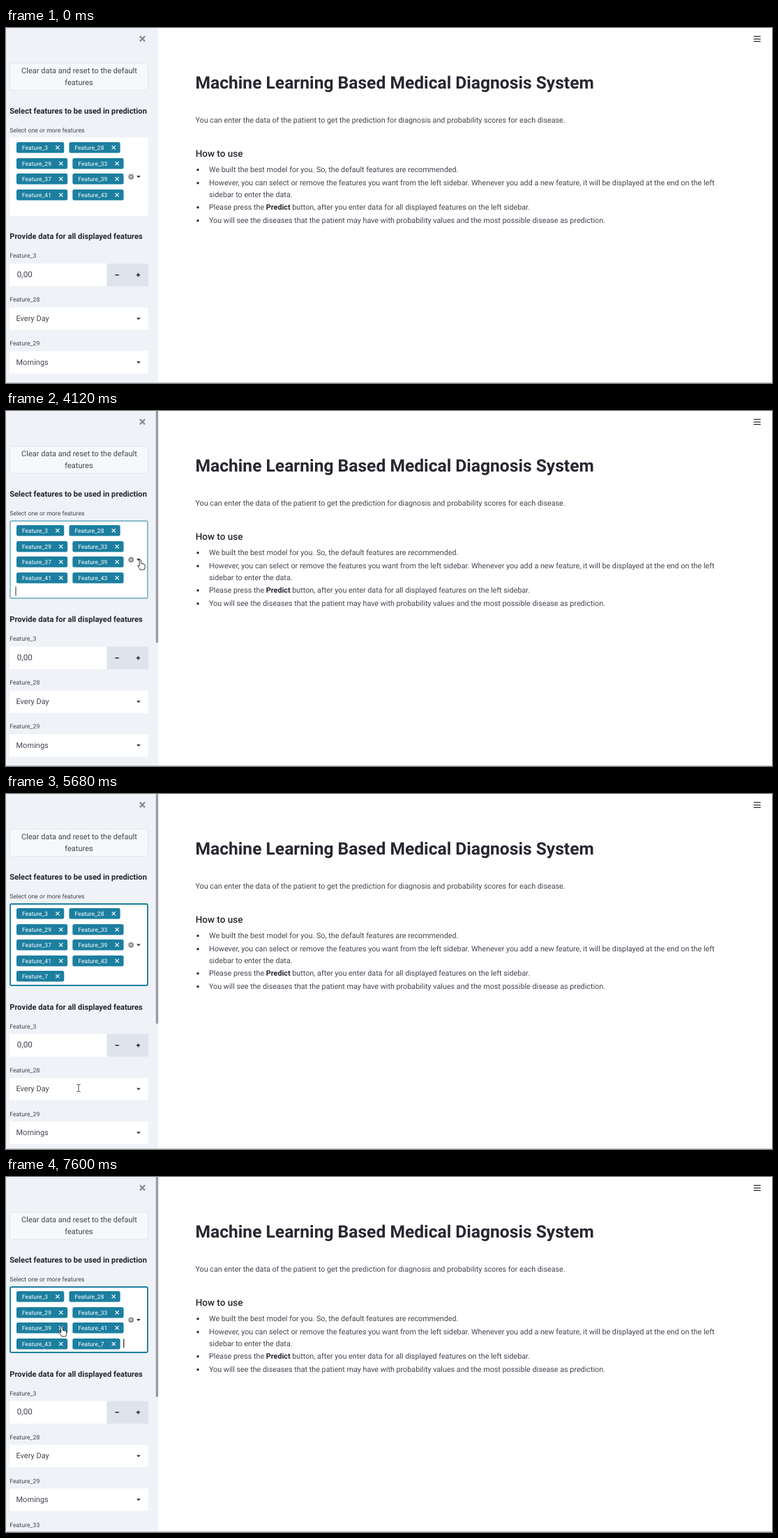
Write an HTML page that moves like this. It is 1098x510 px and loops after 8 s.

```html
<!DOCTYPE html>
<html lang="en">
<head>
<meta charset="utf-8">
<title>Diagnosis form</title>
<style>
html, body { margin: 0; width: 100%; height: 100%; overflow: hidden; background: #fff; }
svg { display: block; width: 1098px; height: 510px; }
text { font-family: Roboto, "Noto Sans", sans-serif; font-size: 11px; fill: #43454f; text-rendering: geometricPrecision; white-space: pre; }
.title { font-size: 24.6px; font-weight: 700; fill: #262730; }
.sub { font-size: 13.5px; font-weight: 500; fill: #262730; }
.head { font-size: 11.2px; font-weight: 700; fill: #262730; }
.body { font-size: 10.78px; }
.body tspan { font-weight: 700; fill: #262730; }
.label { font-size: 8.75px; }
.tag { font-size: 8.5px; fill: #fff; }
.small { font-size: 8.6px; }
.number { font-size: 11.7px; }
.mid { text-anchor: middle; }
.menu { filter: drop-shadow(0 2px 3px rgba(0, 0, 0, .4)); }
</style>
</head>
<body>
<svg id="stage" viewBox="0 0 1098 510"></svg>
<script>
const LOOP = 8000, TEAL = '#1c7fa0', INK = '#262730';
const stage = document.getElementById('stage');

const rect = (x, y, w, h, fill, extra = '') =>
  `<rect x="${x}" y="${y}" width="${w}" height="${h}" fill="${fill}" ${extra}/>`;
const text = (x, y, str, cls = '') => `<text x="${x}" y="${y}" class="${cls}">${str}</text>`;
const line = (d, color, width) =>
  `<path d="${d}" fill="none" stroke="${color}" stroke-width="${width}"/>`;
const cross = (x, y, r, color, width) =>
  line(`M${x - r} ${y - r}l${2 * r} ${2 * r}m0 ${-2 * r}l${-2 * r} ${2 * r}`, color, width);
const arrow = (x, y) => `<path d="M${x - 2.8} ${y - 1.4}h5.6l-2.8 3z" fill="${INK}"/>`;
const group = (opacity, inner, cls = '') => `<g opacity="${opacity}" class="${cls}">${inner}</g>`;
const ramp = (t, a, b) => Math.min(1, Math.max(0, (t - a) / (b - a)));

// Pointer path: time, x, y
const path = [
  [1380, 203, 478], [1590, 166, 360], [1730, 169, 293], [1940, 160, 266],
  [2270, 160, 266], [2650, 198, 232], [2970, 183, 215], [3170, 183, 215],
  [3320, 191.5, 213], [3520, 191.5, 213], [3590, 192.5, 214], [4530, 192.5, 214],
  [5280, 102.5, 422], [5549, 102.5, 422], [5550, 104, 422.5], [6020, 104, 422.5],
  [6710, 88, 218], [6770, 86, 216], [6910, 84.5, 215.5], [7110, 84.5, 215.5],
  [7260, 80, 215], [LOOP, 80, 215]
];
const handTimes = [[1560, 1660], [2760, 5550], [6600, LOOP]];

function pointerAt(t) {
  const i = path.findIndex(p => p[0] > t);
  if (i < 1) return null;
  const [t0, x0, y0] = path[i - 1], [t1, x1, y1] = path[i], k = (t - t0) / (t1 - t0);
  return { x: x0 + (x1 - x0) * k, y: y0 + (y1 - y0) * k,
           hand: handTimes.some(([a, b]) => t >= a && t < b) };
}

function pointer(p) {
  if (!p) return '';
  const shape = p.hand
    ? `<path d="M-1.3 8.5V1.2a1.3 1.3 0 0 1 2.6 0V5.3Q5 5 6.7 7V10.5Q6.5 12 5.8 14H-.3Q-1.5 11.5-3.6 8.5Q-3.6 6.7-1.3 8.5Z" fill="#fff" stroke="#222" stroke-width=".9"/>`
    : line('M-2.7-5.2q2.7 0 2.7 1q0-1 2.7-1M0-4.2V4.2M-2.7 5.2q2.7 0 2.7-1q0 1 2.7 1', '#333', .9);
  return `<g transform="translate(${p.x} ${p.y})">${shape}</g>`;
}

function tags(ids) {
  const width = n => n > 9 ? 73.2 : 68.3;
  return ids.map((id, i) => {
    const x = i % 2 ? 15 + width(ids[i - 1]) + 7.2 : 15;
    const y = Math.round(164 + 22.6 * (i >> 1)), w = width(id);
    return rect(x, y, w, 15.4, TEAL, 'rx="2.5"') +
      text(x + 8, y + 10.7, 'Feature_' + id, 'tag') +
      cross(x + w - 9.4, y + 7.7, 2.6, '#fff', 1.2);
  }).join('');
}

function numberField(t) {
  const hover = t >= 1560 ? 1 - ramp(t, 1660, 1730) : 0;
  const minus = t >= 1560 && t < 1660 ? '#fff' : t >= 1660 && t < 1800 ? 'none' : INK;
  return rect(5, 338.5, 139.5, 32.5, '#fff') + rect(144.5, 338.5, 59.5, 32.5, '#dfe3ec') +
    rect(144.5, 338.5, 30, 32.5, TEAL, `opacity="${hover}"`) +
    text(15.8, 358.2, '0,00', 'number') +
    line('M156.5 354.8h5.4', minus, 1.5) +
    line('M186.8 354.8h5.4m-2.7-2.7v5.4', INK, 1.5);
}

function fields(t) {
  const select = (y, value) =>
    rect(5, y, 199, 32.3, '#fff', 'rx="1"') + text(14.5, y + 19.8, value) + arrow(190, y + 16.2);
  return text(5.2, 303.3, 'Provide data for all displayed features', 'head') +
    [3, 28, 29, 33].map((n, i) => text(5.2, 330.4 + 63 * i, 'Feature_' + n, 'label')).join('') +
    numberField(t) + select(401.4, 'Every Day') + select(464.2, 'Mornings');
}

function sidebar(t) {
  const added = t >= 5550, removed = t >= 7530;
  const ids = removed ? [3, 28, 29, 33, 39, 41, 43, 7]
    : [3, 28, 29, 33, 37, 39, 41, 43].concat(added ? 7 : []);
  const bottom = removed ? 253 : added ? 276 : 269.7;
  const mid = (157 + bottom) / 2 + .3;
  const scroll = removed ? 316 : added ? 330 : 333;
  const caretOn = t >= 4060 && t < 5550 && (t - 4060) % 1000 < 500;
  return rect(0, 0, 218, 510, '#eff2f6') +
    cross(195.5, 15.5, 3.6, '#8d8997', 2.2) +
    rect(5.5, 50.5, 198, 39, '#f6f8fa', 'rx="2.5" stroke="#e4e7ec"') +
    text(105, 65.4, 'Clear data and reset to the default', 'mid') +
    text(104.5, 82, 'features', 'mid') +
    text(5.2, 122.8, 'Select features to be used in prediction', 'head') +
    text(5.2, 150, 'Select one or more features', 'label') +
    rect(5, 157, 199, bottom - 157, '#fff', 'rx="2.5"') +
    rect(6, 158, 197, Math.round(bottom) - 159, 'none',
      `rx="2" stroke="${TEAL}" stroke-width="1.9" opacity="${ramp(t, 3990, 4240)}"`) +
    tags(ids) +
    `<circle cx="179.3" cy="${mid}" r="3.9" fill="#8f8b97"/>` + cross(179.3, mid, 1.4, '#fff', 1) +
    arrow(190, mid) +
    (caretOn ? line('M14 252v13.5', '#333', 1) : '') +
    (removed ? line('M168.8 232.5v13', '#222', 1.2) : '') +
    `<g transform="translate(0 ${bottom - 269.7})">${fields(t)}</g>` +
    (t >= 1380 && t < 4732 || added ? rect(214.8, 0, 3.4, scroll, '#9b9da6', 'rx="1"') : '');
}

function menu(t, p) {
  const shown = ramp(t, 4170, 4330) * (1 - ramp(t, 5450, 5650));
  if (!shown) return '';
  const top = 275.5, step = 26.6, row = Math.floor((p.y + 3 - top) / step);
  const options = [1, 2, 4, 5, 6, 7, 8, 9].map((n, i) =>
    text(16, 292.5 + step * i, 'Feature_' + n)).join('');
  return group(shown,
    rect(5, 270.3, 199, 210.5, '#fff', 'rx="2"') +
    (row >= 0 ? rect(5, top + step * row, 195.5, step, '#f0f1f5') : '') +
    `<clipPath id="list"><path d="M5 270H204V475.5H5z"/></clipPath><g clip-path="url(#list)">${options}</g>` +
    rect(200.5, 276, 3.5, 35, '#a6a7ad', 'rx="1"'), 'menu');
}

const page = rect(0, 0, 1098, 510, '#fff') +
  text(271.5, 87.4, 'Machine Learning Based Medical Diagnosis System', 'title') +
  text(271.5, 135.6, 'You can enter the data of the patient to get the prediction for diagnosis and probability scores for each disease.', 'body') +
  text(271.7, 184.5, 'How to use', 'sub') +
  [[207, 'We built the best model for you. So, the default features are recommended.'],
   [226, 'However, you can select or remove the features you want from the left sidebar. Whenever you add a new feature, it will be displayed at the end on the left'],
   [242.6, 'sidebar to enter the data.'],
   [261, 'Please press the <tspan>Predict</tspan> button, after you enter data for all displayed features on the left sidebar.'],
   [280, 'You will see the diseases that the patient may have with probability values and the most possible disease as prediction.']
  ].map(([y, str], i) => text(291, y, str, 'body') +
    (i === 2 ? '' : `<circle cx="275" cy="${y - 3.2}" r="1.7" fill="${INK}"/>`)).join('') +
  line('M1071.7 12.2h10m-10 3.6h10m-10 3.6h10', INK, 1.3);

const running =
  `<circle cx="951" cy="9.8" r="1.8" fill="#b9bcc2"/>` +
  line('M945 13h12', '#b9bcc2', 1.6) +
  `<path d="M948.8 13h4.4v9.2h-1.5v-4.4h-1.4v4.4h-1.5z" fill="#b9bcc2"/>` +
  `<g opacity=".42">${text(965, 18.9, 'RUNNING...', 'small')}</g>` +
  rect(1015.5, 5.5, 42, 20, '#fff', 'rx="2.5" stroke="#eceef2"') +
  `<g opacity=".85">${text(1036.5, 18.6, 'Stop', 'small mid')}</g>`;

function render(t) {
  const p = pointerAt(t);
  return page + group(ramp(t, 5930, 6000) * (1 - ramp(t, 6790, 6910)), running) +
    sidebar(t) + menu(t, p) + rect(0, 509, 1098, 1, '#c3c7ce') + pointer(p);
}

let last = '';
function tick(now) {
  const svg = render(now % LOOP);
  if (svg !== last) stage.innerHTML = last = svg;
  requestAnimationFrame(tick);
}
tick(0);
</script>
</body>
</html>
```
